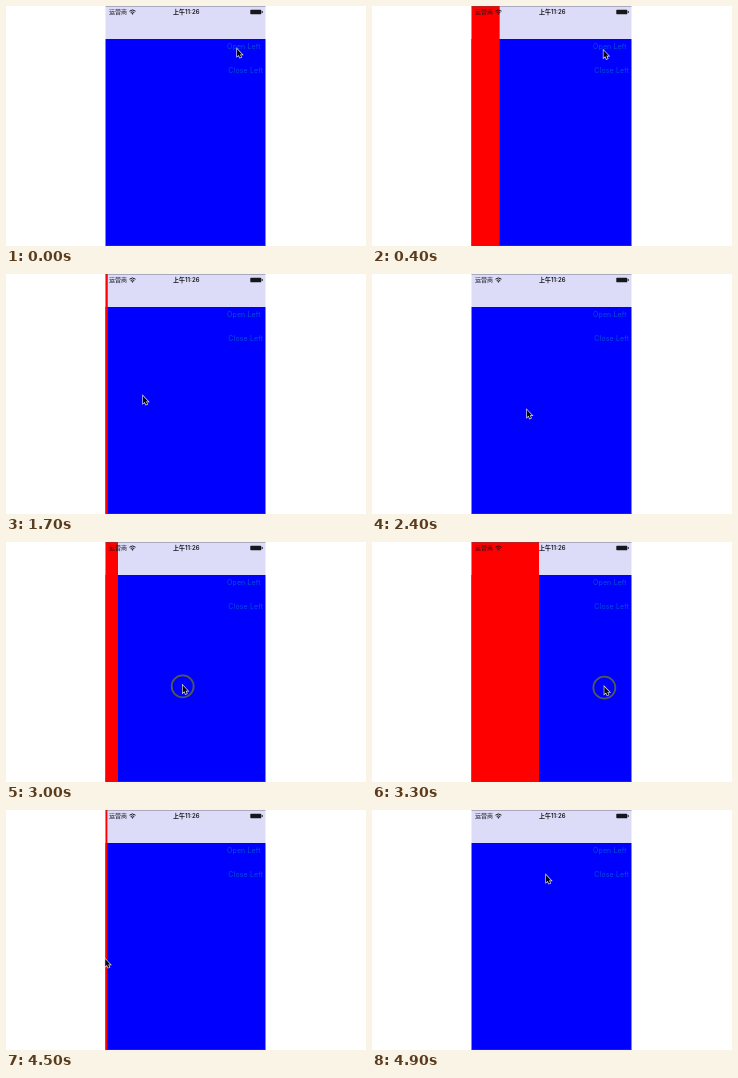
Write an HTML page that moves like this. It is 360 px wide and 240 px high and loops after 5 s.

```html
<!DOCTYPE html>
<html lang="zh">
<head>
<meta charset="utf-8">
<title>Left drawer</title>
<style>
html, body { margin: 0; width: 100%; height: 100%; overflow: hidden; background: #fff; }
svg { display: block; width: 360px; height: 240px; }
.status { font: 6px "Noto Sans CJK SC", "Noto Sans CJK", sans-serif; fill: #16161c; }
.time { font: 600 6px Inter, "Noto Sans CJK SC", sans-serif; text-anchor: middle; }
.button { font: 6.9px Inter, "Liberation Sans", sans-serif; letter-spacing: .2px; fill: #0650d2; }
</style>
</head>
<body>
<svg viewBox="0 0 360 240">
  <rect x="99.5" width="160" height="33" fill="#dcdcf8"/>
  <rect x="99.5" y="33" width="160" height="207" fill="#00f"/>
  <text class="button" x="221" y="42.7">Open Left</text>
  <text class="button" x="222.3" y="66.9">Close Left</text>
  <rect id="drawer" x="99.5" width="0" height="240" fill="#f00"/>
  <path d="M99.5 .25H259.5M99.5 239.75H259.5" stroke="#555560" stroke-width=".5"/>
  <g class="status">
    <text x="103" y="8.2">运营商</text>
    <text class="time" x="180.3" y="8.1">上午11:26</text>
    <path d="M123.5 5.2Q126.5 2.6 129.5 5.2M124.7 6.6Q126.5 5.1 128.3 6.6" fill="none" stroke="#16161c"/>
    <path d="M125.4 7.5Q126.5 6.7 127.6 7.5L126.5 8.7Z"/>
    <rect x="244.3" y="3.7" width="11" height="4.6" rx=".9"/>
    <path d="M255.8 5H256.7V7H255.8Z"/>
  </g>
  <g id="cursor">
    <circle id="ring" cy="1" r="11" fill="none" stroke="#505a50" stroke-width="1.8"/>
    <path d="M0 0V7.4L1.7 5.9L2.9 8.7L4.2 8.1L3 5.5H5.2Z" fill="#08080c"
      stroke="#e4e4ec" stroke-width="1.3" paint-order="stroke"/>
  </g>
</svg>
<script>
const LOOP = 5000, STEP = 100, OPEN_WIDTH = 80;
const get = id => document.getElementById(id);
const drawer = get("drawer"), cursor = get("cursor"), ring = get("ring");

// Tap open, tap close, drag open, drag close
const slides = [
  { start: 200, end: 700, press: 100, release: 200 },
  { start: 1250, end: 1750, press: 1150, release: 1250 },
  { start: 2850, end: 3450, press: 2800, release: 3450 },
  { start: 3900, end: 4560, press: 3950, release: 4450 }
];
const [tapOpen, tapClose, dragOpen, dragClose] = slides;

// Stops of the pointer: time, x, y
const stops = [
  [300, 231, 43], [1000, 240, 67], [tapClose.start, 240, 67], [1700, 137, 122],
  [dragOpen.start, 164, 143], [dragOpen.end, 245, 145],
  [dragClose.start, 171.5, 150.5], [dragClose.end, 97.5, 149], [4900, 174, 65]
];

function ease(t, start, end) {
  const p = Math.min(1, Math.max(0, (t - start) / (end - start)));
  return p * p * (3 - 2 * p);
}

function pointerAt(t) {
  let [last, x, y] = stops[0];
  for (const [time, toX, toY] of stops.slice(1)) {
    const p = ease(t, last, time);
    x += (toX - x) * p;
    y += (toY - y) * p;
    last = time;
  }
  return [x, y];
}

// Slides open and close in turn
function openness(t) {
  return slides.reduce((sum, { start, end }, i) => sum + (i % 2 ? -1 : 1) * ease(t, start, end), 0);
}

function draw(now) {
  const t = Math.floor((now % LOOP) / STEP) * STEP;
  const [x, y] = pointerAt(t);
  const pressed = slides.some(s => t >= s.press && t < s.release);
  drawer.setAttribute("width", Math.max(0, OPEN_WIDTH * openness(t)));
  cursor.setAttribute("transform", `translate(${x} ${y})`);
  ring.setAttribute("visibility", pressed ? "visible" : "hidden");
}

let start;
function tick(now) {
  start ??= now;
  draw(Math.max(0, now - start));
  requestAnimationFrame(tick);
}
draw(0);
requestAnimationFrame(tick);
</script>
</body>
</html>
```
